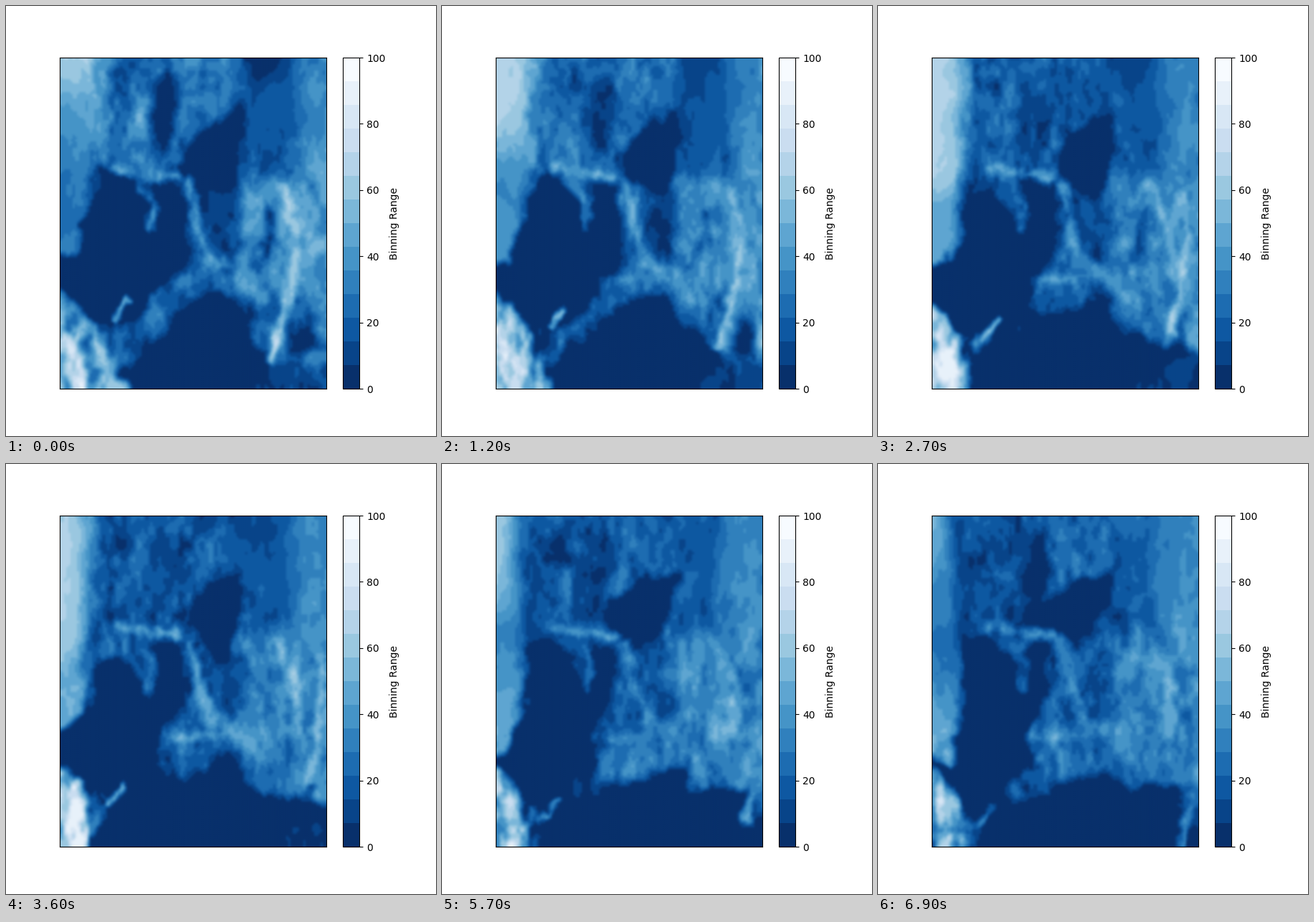
These frames come from a looping animation (600x600 px, 7200 ms). A matplotlib script:

```python
import numpy as np
import matplotlib.pyplot as plt
from matplotlib.animation import FuncAnimation
from matplotlib.path import Path

FRAMES, STEP = 24, 300
X0, X1, Y0, Y1 = 75, 447, 72, 534
NX, NY = 124, 154
X, Y = np.meshgrid(np.linspace(X0, X1, NX), np.linspace(Y0, Y1, NY))
rng = np.random.default_rng(12)
layers = []


def rise(d, width):
    """Smooth step from 0 to 1 as d passes zero."""
    return 0.5 + 0.5 * np.tanh(d / width)


def blend(p, items):
    """Interpolate items spread evenly over the loop, p from 0 to 1."""
    s = p * (len(items) - 1)
    k = min(int(s), max(len(items) - 2, 0))
    f = s - k
    return items[k] * (1 - f) + items[min(k + 1, len(items) - 1)] * f


def blur(a, sigma):
    def kernel(n):
        i = np.arange(n)
        m = np.exp(-((i[:, None] - i) / sigma) ** 2 / 2)
        return m / m.sum(1, keepdims=True)
    return kernel(NY) @ a @ kernel(NX).T


def resample(points, n, closed):
    p = np.array(points, float)
    if closed:
        p = np.vstack([p, p[:1]])
    d = np.r_[0, np.cumsum(np.hypot(*np.diff(p, axis=0).T))]
    s = np.linspace(0, d[-1], n)
    return np.c_[np.interp(s, d, p[:, 0]), np.interp(s, d, p[:, 1])]


def area(values, soft, *poses):
    layers.append((True, values, soft, [resample(q, 72, True) for q in poses]))


def streak(values, width, *poses):
    layers.append((False, values, width, [resample(q, 16, False) for q in poses]))


class Noise:
    """Value noise over the map that changes smoothly with time."""

    def __init__(self, dx, dy, dt):
        self.size = dx, dy, dt
        nx, ny = int((X1 - X0) / dx) + 3, int((Y1 - Y0) / dy) + 3
        self.grid = rng.uniform(-1, 1, (int(FRAMES / dt) + 3, ny, nx))

    def at(self, t):
        dx, dy, dt = self.size
        k = int(t / dt)
        f = (t / dt - k) * np.pi / 2
        g = self.grid[k] * np.cos(f) + self.grid[k + 1] * np.sin(f)
        u, v = (X - X0) / dx, (Y - Y0) / dy
        i, j = u.astype(int), v.astype(int)
        u, v = u - i, v - j
        u, v = u * u * (3 - 2 * u), v * v * (3 - 2 * v)
        top = g[j, i] * (1 - u) + g[j, i + 1] * u
        low = g[j + 1, i] * (1 - u) + g[j + 1, i + 1] * u
        return top * (1 - v) + low * v


# northern cloud, eastern mass and its southern skirt
area((23, 18, 14), 4, [(145, 60), (240, 60), (240, 240), (145, 230)],
     [(105, 60), (230, 60), (225, 240), (105, 240)])
area((29, 18, 25), 4, [(245, 60), (330, 60), (325, 130), (265, 195), (215, 175)])
area((5, 11, 24), 3, [(330, 60), (400, 60), (375, 92), (340, 130)])
area((42, 33, 35), 4, [(325, 245), (460, 235), (460, 410), (350, 410), (322, 370)])
area((23, 31, 30), 5, [(335, 390), (425, 400), (385, 470), (340, 440)])
area((17, 21, 30), 3, [(215, 380), (320, 370), (310, 395), (235, 420)],
     [(205, 375), (330, 365), (320, 425), (240, 445)])

# dark hollows
area((9, 11, 18), 3, [(268, 250), (325, 250), (318, 350), (295, 350)])
area((4, 15, 2), 2, [(202, 105), (240, 85), (240, 145), (225, 215), (205, 180)])
area((2, 2, 1), 2, [(200, 246), (248, 246), (258, 350), (230, 385), (205, 330)],
     [(195, 250), (245, 246), (235, 320), (220, 365), (195, 340)])
area((0,), 1.5,
     [(288, 155), (342, 138), (324, 195), (320, 265), (244, 248), (245, 212)],
     [(282, 163), (330, 150), (322, 220), (300, 288), (270, 240), (252, 205)],
     [(275, 168), (335, 140), (318, 200), (275, 248), (205, 235), (208, 197)])
area((0,), 1.2,
     [(140, 220), (190, 248), (222, 255), (225, 385), (180, 440), (122, 448),
      (60, 385), (60, 358), (104, 345), (106, 295)],
     [(128, 268), (160, 268), (192, 330), (216, 358), (215, 420), (200, 470),
      (110, 455), (60, 400), (60, 380), (112, 350)],
     [(115, 245), (150, 237), (205, 285), (235, 320), (210, 380), (215, 420),
      (170, 510), (120, 490), (60, 405), (105, 420), (118, 340)])
area((0,), 1.5,
     [(185, 490), (260, 408), (318, 400), (358, 485), (380, 505), (335, 545), (120, 545)],
     [(140, 465), (205, 412), (250, 452), (312, 400), (335, 455), (460, 485), (460, 545),
      (115, 545)],
     [(145, 500), (245, 450), (325, 430), (355, 460), (430, 440), (420, 545), (120, 545)])
area((2, 0), 2, [(422, 405), (445, 485), (395, 485)], [(440, 450), (430, 535), (405, 520)])
area((13, 0), 3, [(385, 495), (460, 490), (460, 545), (350, 545)])
area((28, 2, 27), 3, [(185, 440), (200, 428), (222, 445), (205, 472), (185, 472)])

# bands and filaments
streak((38, 24, 23), 12, [(190, 130), (185, 175), (192, 232)], [(165, 160), (175, 225)])
streak((37, 43, 34), 7, [(155, 226), (195, 234), (240, 239)])
streak((26, 24, 26), 7, [(185, 250), (203, 275), (200, 310)])
streak((37, 37, 32), 9, [(256, 250), (270, 320), (288, 358)])
streak((41, 40, 35), 12, [(282, 360), (318, 374), (355, 410)])
streak((22, 41, 37), 8, [(235, 385), (280, 379), (315, 372)])
streak((18, 25, 32), 9, [(368, 290), (370, 325), (345, 365)])
streak((40, 48, 42), 9, [(378, 250), (405, 300), (412, 370)])
streak((60, 52, 31), 7, [(389, 250), (403, 320), (398, 400), (370, 495)],
     [(436, 265), (440, 320), (435, 370), (422, 440)],
     [(445, 330), (445, 430), (425, 532)])

# bright south-west corner and the wisp beside it
area((50, 55, 34), 1.3, [(60, 400), (128, 458), (142, 492), (180, 545), (60, 545)],
     [(60, 425), (105, 455), (112, 505), (108, 545), (60, 545)],
     [(60, 405), (92, 435), (122, 505), (95, 545), (60, 545)])
streak((80, 78, 60), 12, [(78, 465), (98, 495), (104, 534)], [(82, 455), (95, 490), (90, 534)])
streak((50, 46, 24), 5, [(168, 412), (158, 425), (153, 437)], [(160, 480), (145, 500), (132, 507)])

coarse = [Noise(26, 30, 5) for _ in range(2)]
fine = [Noise(9, 13, 3) for _ in range(2)]
grain = [(Noise(22, 44, 4), 0.6), (Noise(10, 20, 3), 0.7), (Noise(6, 10, 2), 0.4)]


def distance2(px, py, line):
    best = np.full(X.shape, 1e9)
    for (ax, ay), (bx, by) in zip(line[:-1], line[1:]):
        dx, dy = bx - ax, by - ay
        s = np.clip(((px - ax) * dx + (py - ay) * dy) / (dx * dx + dy * dy + 1e-9), 0, 1)
        best = np.minimum(best, (px - ax - s * dx) ** 2 + (py - ay - s * dy) ** 2)
    return best


def background(px, py, p):
    """Brighter eastern margin and the western wall, which swells and shrinks."""
    z = 17 + 17 * rise(px - 412 + 28 * p, 14)
    z += 6 * rise(py - 180, 25) * rise(px - 415, 12)
    swell = np.sin(np.pi * p)
    depth = 115 + 150 * swell
    wall = 36 + 9 * swell * rise(py - 250, 40) + 10 * p * rise(py - 310, 20)
    wall += (33 - 8 * p) * rise(depth - py, 50 - 25 * swell) * rise(128 - 36 * p - px, 15)
    wall -= 7 * (1 - swell) * rise(py - 210, 20) * rise(340 - py, 20)
    edge = 108 + 40 * (1 - p) * rise(225 - py, 25)
    return z + (wall - z) * rise(edge - px, 8)


def field(t):
    p = t / (FRAMES - 1)
    wx, wy = (6 * c.at(t) + 7 * f.at(t) for c, f in zip(coarse, fine))
    px, py = X + wx, Y + wy
    points = np.c_[px.ravel(), py.ravel()]
    z = background(X + wx / 2, Y + wy, p)
    for filled, values, size, poses in layers:
        shape = blend(p, poses)
        if filled:
            inside = Path(shape).contains_points(points).reshape(X.shape)
            mask = blur(inside.astype(float), size)
        else:
            mask = np.exp(-distance2(X + wx / 2, Y + wy / 2, shape) / size ** 2)
        z += (blend(p, values) - z) * mask
    # calm in the north-east and along the wall, rough in the corner
    calm = np.exp(-((X - 390) / 80) ** 2 - ((Y - 130) / 100) ** 2)
    calm = np.maximum(calm, rise(115 - X, 10) * rise(380 - Y, 20))
    rough = 1 - 0.75 * calm + 1.2 * rise(140 - X, 10) * rise(Y - 430, 10)
    tex = sum(w * n.at(t) for n, w in grain)
    z += 13 * tex * rough * np.clip((z - 1) / 16, 0, 1)
    return np.clip(z, 0, 92)


fig, ax = plt.subplots(figsize=(6, 6), dpi=100)
image = ax.imshow(field(0), cmap=plt.get_cmap("Blues_r", 14), vmin=0, vmax=100,
                  aspect="auto", interpolation="bicubic", interpolation_stage="rgba")
ax.set_xticks([])
ax.set_yticks([])
fig.colorbar(image, ax=ax, label="Binning Range")


def update(i):
    image.set_data(field(i))
    return [image]


anim = FuncAnimation(fig, update, frames=FRAMES, interval=STEP, repeat=True, repeat_delay=0)
plt.show()
```
